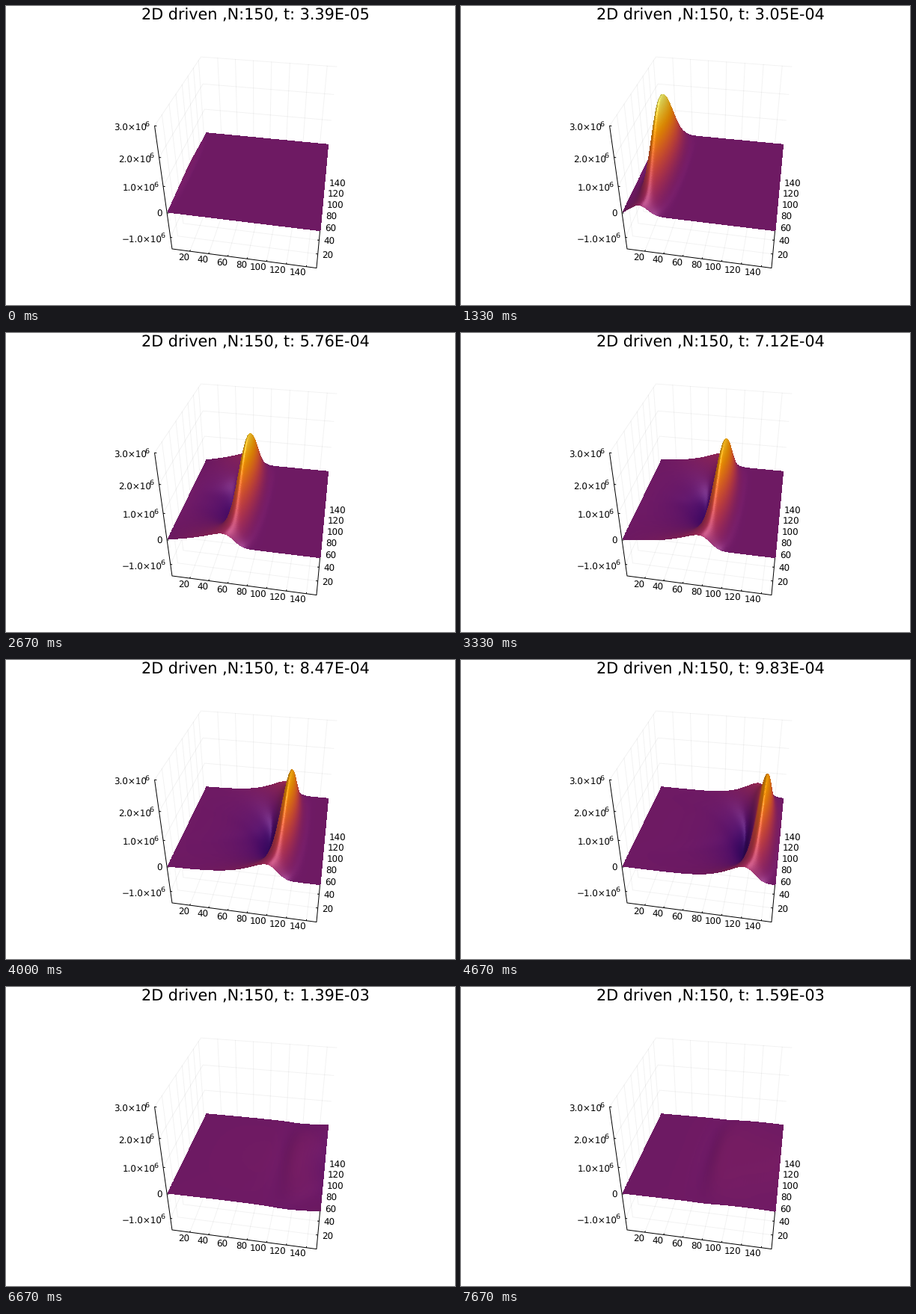
Animation, 600 px wide and 400 px high, one loop 8 s. Source, as a matplotlib script:

```python
import numpy as np
import matplotlib.pyplot as plt
from matplotlib.animation import FuncAnimation

W, H, DPI = 600, 400, 100
SHOT_COUNT, LOOP_MS, INTERVAL = 24, 8000, 50
N, STEPS, COURANT = 150, 15, 0.7
Z_MIN, Z_MAX = -1.5e6, 3.0e6
HALF_DT = 3.3898e-5

plt.rcParams["font.family"] = "DejaVu Sans"
plt.rcParams["text.hinting"] = "none"


def px(pixels):
    return pixels * 72 / DPI


# Perspective camera around the cube [-1, 1]^3
AZ, EL = np.radians([10, 35])
DIST, FOCAL, CX, CY = 6.692, 635, 333.4, 201.4
RIGHT = np.array([np.cos(AZ), np.sin(AZ), 0])
UP = np.array([-np.sin(AZ) * np.sin(EL), np.cos(AZ) * np.sin(EL), np.cos(EL)])
VIEW = np.array([np.sin(AZ) * np.cos(EL), -np.cos(AZ) * np.cos(EL), np.sin(EL)])


def project(x, y, z):
    def dot(v):
        return v[0] * x + v[1] * y + v[2] * z

    scale = FOCAL / (DIST - dot(VIEW))
    return CX + scale * dot(RIGHT), CY - scale * dot(UP)


def unit_xy(v):
    return -1 + 2 * (v - 1) / (N - 1)


def unit_z(v):
    return -1 + 2 * (v - Z_MIN) / (Z_MAX - Z_MIN)


def absorb(edge, inner, new_inner, courant):
    """One-way wave condition at an open edge."""
    return inner + (courant - 1) / (courant + 1) * (new_inner - edge)


# Wave equation: driven left edge, absorbing conditions on the other three
def simulate():
    rows = np.arange(N) - (N - 1) / 2
    drive = Z_MAX * np.exp(-(rows / 34) ** 2 / 2)
    old, u = np.zeros((N, N)), np.zeros((N, N))
    shots = []
    for step in range(STEPS * SHOT_COUNT):
        new = np.zeros((N, N))
        lap = (u[2:, 1:-1] + u[:-2, 1:-1] + u[1:-1, 2:] + u[1:-1, :-2]
               - 4 * u[1:-1, 1:-1])
        new[1:-1, 1:-1] = 2 * u[1:-1, 1:-1] - old[1:-1, 1:-1] + COURANT ** 2 * lap
        # A slight mismatch on the right leaves a faint echo
        new[:, -1] = absorb(u[:, -1], u[:, -2], new[:, -2], 0.94 * COURANT)
        new[0] = absorb(u[0], u[1], new[1], COURANT)
        new[-1] = absorb(u[-1], u[-2], new[-2], COURANT)
        new[:, 0] = drive * np.exp(-((step - 32.5) / 10) ** 2 / 2)
        old, u = u, new
        if step % STEPS == STEPS // 2:
            shots.append(u)
    return shots


def upsampler(count):
    fine = np.linspace(0, N - 1, count)
    return np.array([np.interp(fine, np.arange(N), row) for row in np.eye(N)]).T


FINE_X, FINE_Y = 1200, 480
TO_X, TO_Y = upsampler(FINE_X).T, upsampler(FINE_Y)[::-1]  # far rows first
# Inset by half a pixel, so that only pixels with a covered centre are filled
GX, GY = np.meshgrid(np.linspace(-0.995, 0.995, FINE_X),
                     np.linspace(0.991, -0.991, FINE_Y))
LIGHT = np.array([0.478, -0.335, 0.813])
HALF = (LIGHT + VIEW) / np.linalg.norm(LIGHT + VIEW)
CMAP = plt.get_cmap("inferno")


def surface_image(u):
    z = unit_z(u)
    slope_y, slope_x = np.gradient(z, 2 / (N - 1))
    z, sx, sy = (TO_Y @ a @ TO_X for a in (z, slope_x, slope_y))
    length = np.sqrt(1 + sx ** 2 + sy ** 2)

    def facing(v):
        return np.clip((v[2] - v[0] * sx - v[1] * sy) / length, 0, 1)

    shade = 0.706 + 0.25 * facing(LIGHT)
    gloss = 0.2 * facing(HALF) ** 14
    rgb = CMAP((z + 1) / 2)[..., :3] * shade[..., None] + gloss[..., None]

    # Painter's order: later (nearer) samples overwrite earlier ones
    image = np.zeros((H, W, 4))
    col, row = project(GX, GY, z)
    col = np.clip((col + 0.2).astype(int), 0, W - 1).ravel()
    row = np.clip((row - 0.3).astype(int), 0, H - 1).ravel()
    image[row, col, :3] = np.clip(rgb, 0, 1).reshape(-1, 3)
    image[row, col, 3] = 1
    return image


IMAGES = [surface_image(u) for u in simulate()]

fig = plt.figure(figsize=(W / DPI, H / DPI), dpi=DPI, facecolor="white")
ax = fig.add_axes([0, 0, 1, 1])
ax.axis("off")


def path(*points, **style):
    xs, ys = project(*np.array(points, float).T)
    ax.plot(xs, ys, lw=px(1), zorder=1, **style)


def label(x, y, text, size=11.9, ha="left"):
    """Text whose digits are centred vertically on y."""
    return ax.text(x, y + 0.365 * size, text, fontsize=px(size), ha=ha,
                   va="baseline", zorder=3)


GRID = dict(color="black", alpha=0.05)
AXIS = dict(color="black", solid_capstyle="butt")
TICK = 0.025

for value in range(20, 141, 20):
    p = unit_xy(value)
    path((p, -1, -1), (p, 1, -1), (p, 1, 1), **GRID)
    path((1, p, -1), (-1, p, -1), (-1, p, 1), **GRID)
    path((p, -1, -1), (p, -1 + TICK, -1), **AXIS)
    path((1, p, -1), (1 - TICK, p, -1), **AXIS)
    x, y = project(p, -1, -1)
    label(x - 0.2, y + 8.2, str(value), ha="right")
    x, y = project(1, p, -1)
    label(x + 5.8, y + 1.6, str(value))

for millions in range(-1, 4):
    p = unit_z(millions * 1e6)
    path((-1, -1, p), (-1, 1, p), (1, 1, p), **GRID)
    path((-1, -1, p), (-1 + TICK, -1, p), **AXIS)
    x, y = project(-1, -1, p)
    if millions == 0:
        label(x - 6.3, y + 0.5, "0", ha="right")
        continue
    text = f"{millions:.1f}×10".replace("-", "−")
    label(x - 10.8, y + 2.7, text, ha="right")
    label(x - 13.0, y - 2.8, "6", size=9.5)

path((-1, -1, 1), (-1, -1, -1), (1, -1, -1), (1, 1, -1), **AXIS)

surface = ax.imshow(IMAGES[0], extent=(0, W, H, 0), aspect="auto",
                    interpolation="nearest", zorder=2)
title = label(CX, 10.5, "", size=20.8, ha="center")
ax.set_xlim(0, W)
ax.set_ylim(H, 0)


def update(i):
    # Changes fall on the last 50 ms step before each third of a second
    shot = int((i * INTERVAL + 35) * SHOT_COUNT / LOOP_MS)
    surface.set_data(IMAGES[shot])
    title.set_text(f"2D driven ,N:{N}, t: {HALF_DT * (2 * shot + 1):.2E}")
    return surface, title


anim = FuncAnimation(fig, update, frames=LOOP_MS // INTERVAL, interval=INTERVAL,
                     repeat=True, repeat_delay=0)
plt.show()
```
